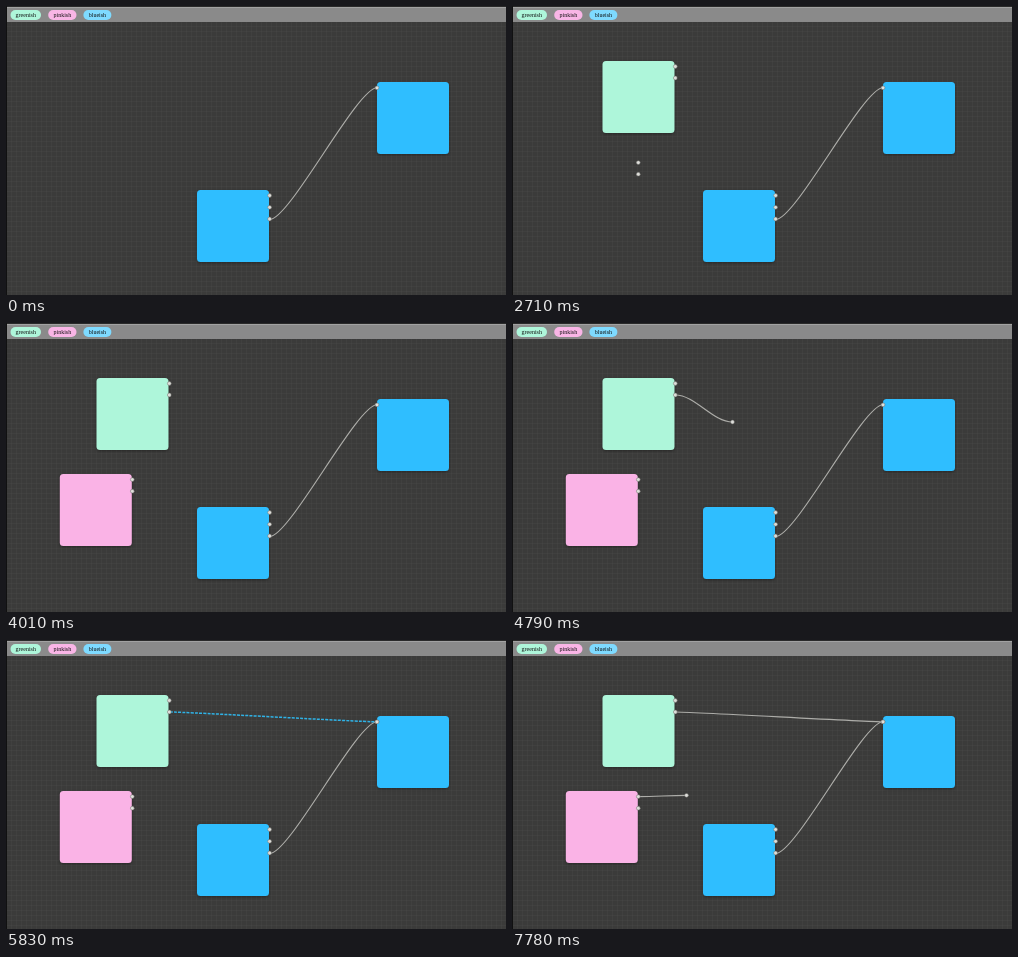
Recreate the animation shown at these times as an HTML page. Size 500 by 289 pixels, loop 7.91 s.

```html
<!DOCTYPE html>
<html lang="en">
<head>
<meta charset="utf-8">
<title>Node editor</title>
<style>
  html, body { margin: 0; width: 100%; height: 100%; overflow: hidden; background: #3b3b3a; }
  svg { display: block; width: 100vw; height: 100vh; }
  text { font: 6px "Liberation Serif", "Times New Roman", serif; text-anchor: middle; fill: #111; }
  .box { filter: drop-shadow(0 1px 1.5px rgba(0, 0, 0, .35)); }
  .wire { fill: none; stroke: #adada9; stroke-width: 1.15; }
  .wire.active { stroke: #2fb2e6; stroke-width: 1.5; stroke-dasharray: 3 1.2; }
  .port { fill: #dededa; stroke: #6c6c68; stroke-width: .5; }
</style>
</head>
<body>
<svg viewBox="0 0 500 289" preserveAspectRatio="none">
  <defs>
    <pattern id="grid" width="5" height="5" patternUnits="userSpaceOnUse">
      <path d="M0 .5H5M.5 0V5" stroke="#fff" stroke-opacity=".022"/>
    </pattern>
  </defs>
  <rect width="500" height="289" fill="#3b3b3a"/>
  <rect width="500" height="289" fill="url(#grid)"/>
  <rect width="500" height="16" fill="#8a8a8a"/>
  <rect width="500" height="1" fill="#2a2a2a"/>
  <rect y="1" width="500" height="1" fill="#a2a2a2"/>
  <rect width="1" height="289" fill="#111"/>
  <g id="bar"></g>
  <g id="boxes"></g>
  <g id="wires"></g>
  <g id="ports"></g>
</svg>
<script>
const LOOP = 7910, TICK = 130, FIRST = 500;
const GREEN = '#aef6da', PINK = '#fab3e6', BLUE = '#2fbeff';
const $ = id => document.getElementById(id);

function add(parent, tag, attrs) {
  const el = document.createElementNS('http://www.w3.org/2000/svg', tag);
  for (const key in attrs) el.setAttribute(key, attrs[key]);
  return parent.appendChild(el);
}

function pill(x, width, fill, label) {
  add($('bar'), 'rect', { x, y: 4, width, height: 10, rx: 5, fill });
  add($('bar'), 'text', { x: x + width / 2, y: 10.8 }).textContent = label;
}

const box = (x, y, fill) =>
  add($('boxes'), 'rect', { class: 'box', x, y, width: 72, height: 72, rx: 3.5, fill });
const port = (x, y, parent = $('ports')) =>
  add(parent, 'circle', { class: 'port', cx: x, cy: y, r: 1.9 });
const wire = () => add($('wires'), 'path', { class: 'wire' });

function route(path, [x1, y1], [x2, y2]) {
  const bend = Math.min(20, Math.abs(x2 - x1) / 2);
  path.setAttribute('d', `M${x1} ${y1}C${x1 + bend} ${y1} ${x2 - bend} ${y2} ${x2} ${y2}`);
}

pill(4.5, 30.5, GREEN, 'greenish');
pill(42.2, 28.3, '#f9b5e6', 'pinkish');
pill(77.4, 28, '#7edaff', 'blueish');

const green = box(90.5, 55, GREEN);
const pink = box(53.8, 151, PINK);
box(191, 184, BLUE);
box(371, 76, BLUE);

const greenPorts = add($('ports'), 'g');
const pinkPorts = add($('ports'), 'g');
[60.5, 72].forEach(y => port(163.3, y, greenPorts));
[156.6, 168.2].forEach(y => port(126.3, y, pinkPorts));
[189.5, 201.3, 213].forEach(y => port(263.6, y));

const greenOut = [163.3, 72], pinkOut = [126.3, 156.6], goal = [371, 81.8];
route(wire(), [263.6, 213.6], goal);
const greenWire = wire(), pinkWire = wire();
const greenEnd = port(0, 0), pinkEnd = port(0, 0);
port(...goal);

// Drag paths: time, x, y
const greenDrag = [
  [4400, 163.3, 72], [4530, 169, 75], [4660, 192, 87], [4790, 220.5, 99],
  [4920, 261, 103], [5050, 305, 98], [5180, 343, 89], [5310, 366, 83], [5440, ...goal]
];
const pinkDrag = [[7390, ...pinkOut], [7520, 132, 156.6], [7650, 132, 156.6], [7780, 174.5, 155.3]];

function along(keys, t) {
  let i = 1;
  while (i < keys.length - 1 && keys[i][0] < t) i++;
  const [t0, x0, y0] = keys[i - 1], [t1, x1, y1] = keys[i];
  const k = Math.min(1, Math.max(0, (t - t0) / (t1 - t0)));
  return [x0 + (x1 - x0) * k, y0 + (y1 - y0) * k];
}

const show = (el, on) => { el.style.display = on ? '' : 'none'; };

function appear(rect, ports, start, t) {
  rect.style.opacity = Math.min(1, Math.max(0, (t - start) / 390));
  show(rect, t > start);
  show(ports, t >= start);
}

function drag(path, end, from, keys, t) {
  const on = t > keys[0][0], p = along(keys, t);
  show(path, on);
  show(end, on);
  route(path, from, p);
  end.setAttribute('cx', p[0]);
  end.setAttribute('cy', p[1]);
}

function draw(now) {
  const time = now % LOOP;
  const t = time < FIRST ? 0 : FIRST + Math.floor((time - FIRST) / TICK) * TICK;
  appear(green, greenPorts, 500, t);
  appear(pink, pinkPorts, 2710, t);
  drag(greenWire, greenEnd, greenOut, greenDrag, t);
  drag(pinkWire, pinkEnd, pinkOut, pinkDrag, t);
  greenWire.classList.toggle('active', t >= 5440 && t < 6220);
  greenWire.style.strokeDashoffset = -(t - 5440) / TICK * 1.6;
}

const start = performance.now();
function frame() {
  draw(performance.now() - start);
  requestAnimationFrame(frame);
}
frame();
</script>
</body>
</html>
```
